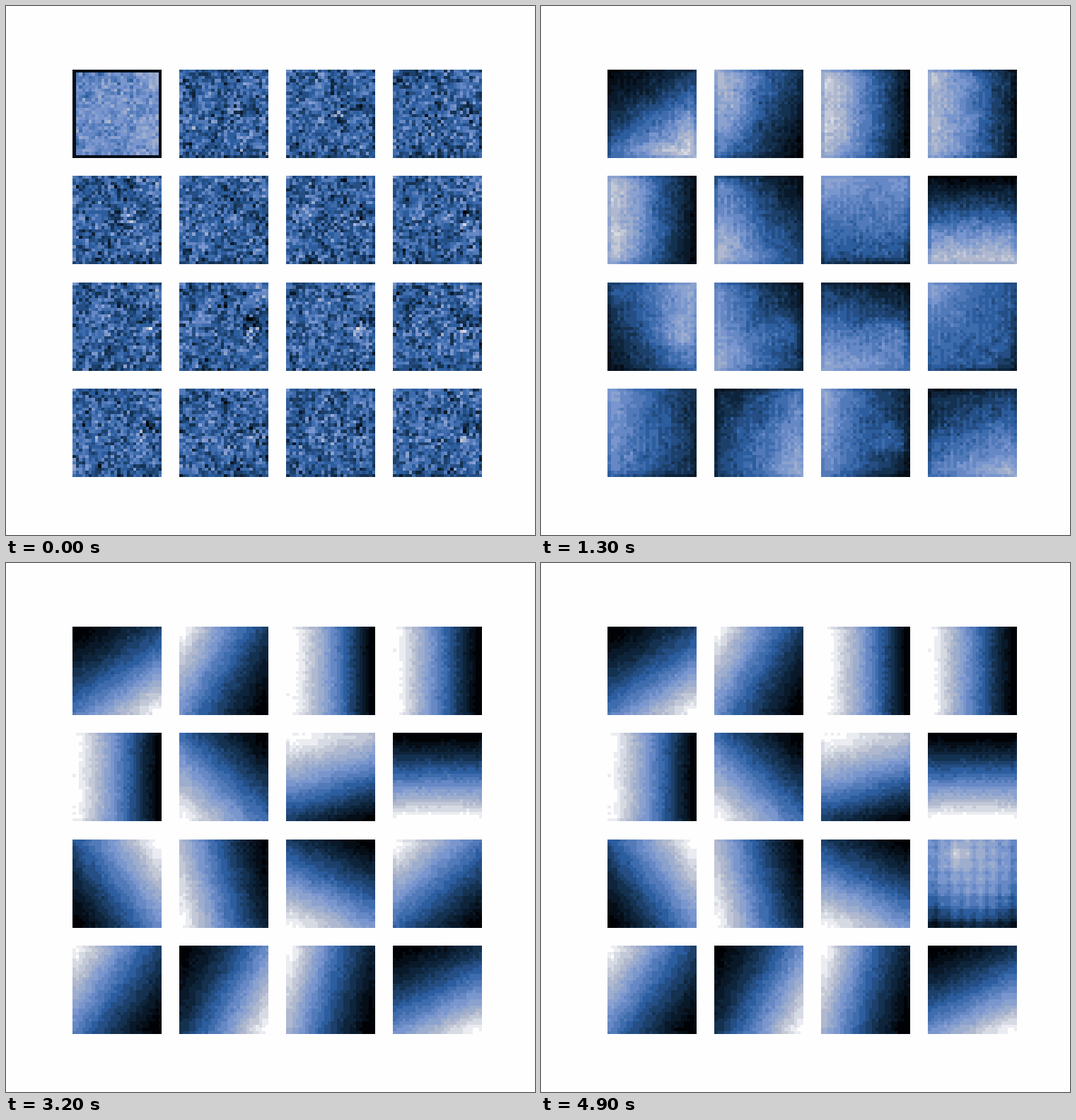
These frames come from a looping animation (748x748 px, 5 s). An HTML page with a canvas:

```html
<!DOCTYPE html>
<html lang="en">
<head>
<meta charset="utf-8">
<title>Sample grid</title>
<style>
  html, body { margin: 0; width: 100%; height: 100%; overflow: hidden; background: #fefefe; }
  canvas { display: block; }
</style>
</head>
<body>
<canvas id="stage" width="748" height="748"></canvas>
<script>
const ctx = document.getElementById('stage').getContext('2d');
const N = 28, LAST = N - 1, STEP_MS = 100, FRAMES = 50, LEVELS = 18;

const clamp = (v, a = 0, b = 1) => Math.min(b, Math.max(a, v));
const mix = (a, b, t) => a + (b - a) * t;
const ease = t => { t = clamp(t); return t * t * (3 - 2 * t); };
const bell = (x, y, cx, cy, r) => Math.exp(-((x - cx) ** 2 + (y - cy) ** 2) / (r * r));

// Black through blue to white
const stops = [
  [0, 2, 5], [17, 43, 70], [46, 96, 163], [118, 148, 206], [182, 189, 206], [254, 254, 254]
];
const ramp = Array.from({ length: LEVELS + 1 }, (_, i) => {
  const p = i / LEVELS * (stops.length - 1), k = Math.min(stops.length - 2, Math.floor(p));
  return `rgb(${stops[k].map((c, j) => Math.round(mix(c, stops[k + 1][j], p - k)))})`;
});

function random(seed) {
  return () => {
    seed = (seed + 0x6D2B79F5) | 0;
    let t = Math.imul(seed ^ seed >>> 15, 1 | seed);
    t = t + Math.imul(t ^ t >>> 7, 61 | t) ^ t;
    return ((t ^ t >>> 14) >>> 0) / 4294967296;
  };
}

// Cell noise laid over softer patches
function grain(seed, patch = .5) {
  const r = random(seed), M = 9;
  const normal = () => (r() + r() + r() + r() - 2) * 1.7;
  const coarse = Array.from({ length: M * M }, normal);
  return Float32Array.from({ length: N * N }, (_, n) => {
    const x = n % N / N * (M - 1), y = Math.floor(n / N) / N * (M - 1);
    const i = Math.floor(x), j = Math.floor(y), at = j * M + i;
    const soft = mix(mix(coarse[at], coarse[at + 1], x - i),
      mix(coarse[at + M], coarse[at + M + 1], x - i), y - j);
    return normal() + patch * soft;
  });
}
const shared = grain(7), sharedMid = grain(21, 1);

// Rough forms that appear while the noise clears
const corner = (x, y) => .1 + .62 * ease(.8 * y + .55 * x - .25);
const low = (x, y) => .14 + .4 * ease(y * 1.1) + .08 * x * y;
const left = (x, y) => .42 - .18 * x - .12 * x * y + .18 * bell(x, y, .2, .22, .25) + .18 * bell(x, y, .18, .65, .25);
const blob = (x, y) => .22 + .06 * x + .1 * y + .36 * bell(x, y, .82, .6, .25);
const even = (x, y) => .42 + .06 * bell(x, y, .3, .5, .4) - .06 * x * y;

// Direction of the light in degrees, brightness at the centre, rough form
const panels = [
  [57, .39, corner], [208, .41, left], [180, .6, left], [180, .52, even],
  [181, .55, left], [135, .44, left], [253, .57, corner], [90, .46, low],
  [327, .46, blob], [166, .44, blob], [117, .44, blob], [228, .46, corner],
  [214, .41, low], [27, .39, even], [194, .41, blob], [65, .39, even]
].map(([deg, centre, form], i) => {
  const a = deg * Math.PI / 180, cos = Math.cos(a), sin = Math.sin(a), reach = Math.abs(cos) + Math.abs(sin);
  return {
    i, centre, form, dx: cos / reach, dy: sin / reach,
    left: 94 + 151 * (i % 4), top: Math.round(90 + 150.33 * Math.floor(i / 4)),
    start: grain(100 + i), mid: grain(200 + i, 1), fine: grain(300 + i, 1)
  };
});

const rimOf = (c, r) => Math.min(c, r, LAST - c, LAST - r);

function noisy(p, c, r, n, x, y) {
  const g = .08 * p.start[n] + .07 * shared[n];
  if (p.i === 0) return rimOf(c, r) ? .55 + .08 * x + .6 * g : .08;
  const spot = bell(x, y, p.form === left ? .62 : .83, .5, .1);
  const v = .4 + g * (1 + spot) + .08 * spot;
  return c === LAST || r === LAST ? v - .1 : v;
}

function emerging(p, c, r, n, x, y) {
  const v = p.form(x, y), rim = rimOf(c, r);
  const stripe = (c % 2 ? 1 : -1) * .02;
  const out = v + (.05 * p.mid[n] + .04 * sharedMid[n] + stripe) * (.6 + v);
  return out * (rim === 0 ? .5 : rim === 1 ? .85 : 1);
}

// Curved slope from 0 to 1 that passes through the centre value
function settled(p, x, y) {
  const u = (2 * x - 1) * p.dx + (2 * y - 1) * p.dy;
  return p.centre + .55 * u + (.5 - p.centre) * u * u;
}

// Late breakdown of one panel into a woven blur
function woven(c, r, x, y) {
  return .7 - .52 * y ** 3 - .14 * (2 * x - 1) ** 2 + .16 * bell(x, y, .33, .15, .12)
    + .035 * Math.cos(c * 1.57) + .025 * Math.cos(r * 1.57);
}

function smooth(p, c, r, n, x, y, k) {
  let v = settled(p, x, y);
  if (p.i === 11) v = mix(v, woven(c, r, x, y), ease((k - 46) / 3));
  v += .01 * p.fine[n] + .005 * Math.sin(k * .35 + n * 2.4);
  v += (c % 2 && r % 2 ? .012 : -.006) * (2 - ease((k - 17) / 16));
  return rimOf(c, r) ? v : mix(v, .4, .07);
}

function draw(k) {
  ctx.fillStyle = '#fefefe';
  ctx.fillRect(0, 0, 748, 748);
  const s1 = ease(k / 9), s2 = ease((k - 9) / 7);
  for (const p of panels) {
    for (let r = 0; r < N; r++) for (let c = 0; c < N; c++) {
      const n = r * N + c, x = c / LAST, y = r / LAST;
      let v = s2 < 1 ? mix(noisy(p, c, r, n, x, y), emerging(p, c, r, n, x, y), s1) : 0;
      if (s2 > 0) v = mix(v, smooth(p, c, r, n, x, y, k), s2);
      const x0 = Math.round(c * 126 / N), x1 = Math.round((c + 1) * 126 / N);
      const y0 = Math.round(r * 125 / N), y1 = Math.round((r + 1) * 125 / N);
      ctx.fillStyle = ramp[Math.round(clamp(v) * LEVELS)];
      ctx.fillRect(p.left + x0, p.top + y0, x1 - x0, y1 - y0);
    }
  }
}

const began = performance.now();
let shown = -1;
function tick() {
  const k = Math.floor((performance.now() - began) / STEP_MS) % FRAMES;
  if (k !== shown) draw(shown = k);
  requestAnimationFrame(tick);
}
tick();
</script>
</body>
</html>
```
